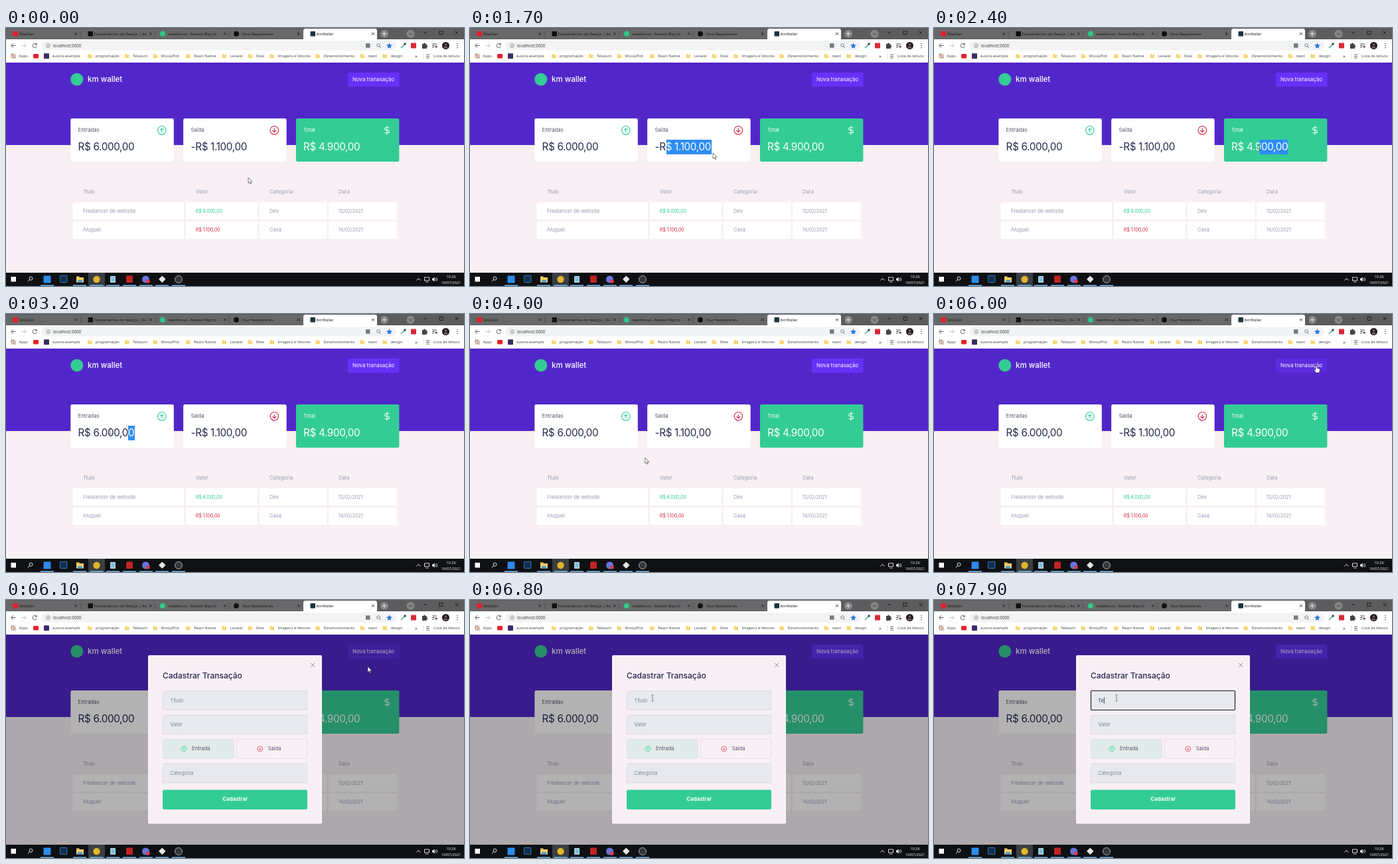
An HTML page that plays this animation: 690 px wide and 388 px high, repeating every 8 s.

```html
<!DOCTYPE html>
<html lang="pt-BR">
<head>
<meta charset="utf-8">
<title>km wallet</title>
<style>
  html, body { margin: 0; width: 100%; height: 100%; overflow: hidden; background: #101114; }
  svg { display: block; width: 100%; height: 100%; }
  text { white-space: pre; }
  .page { font-family: Inter, sans-serif; }
  .ui { font-family: "Open Sans", sans-serif; }
  .num { letter-spacing: -.02em; }
</style>
</head>
<body>
<svg id="stage" viewBox="0 0 690 388"></svg>
<script>
const GREEN = '#33cc95', RED = '#d92b4b', NAVY = '#24294d', GRAY = '#969cb3', PAGE = '#f8f0f4';
const LOOP = 8000, STEP = 100;

// Markup helpers
const rect = (x, y, w, h, fill, r = 0, more = '') =>
  `<rect x="${x}" y="${y}" width="${w}" height="${h}" rx="${r}" fill="${fill}" ${more}/>`;
const disc = (x, y, r, fill, more = '') => `<circle cx="${x}" cy="${y}" r="${r}" fill="${fill}" ${more}/>`;
const line = (d, color, w = 1, more = '') =>
  `<path d="${d}" fill="none" stroke="${color}" stroke-width="${w}" ${more}/>`;
const shape = (d, fill, more = '') => `<path d="${d}" fill="${fill}" ${more}/>`;
const text = (x, y, s, size, fill, more = '') =>
  `<text x="${x}" y="${y}" font-size="${size}" fill="${fill}" ${more}>${s}</text>`;
const group = (content, more = '') => `<g ${more}>${content}</g>`;
const MIDDLE = 'text-anchor="middle"';

const cross = (x, y, r, color, w) =>
  line(`M${x - r} ${y - r}l${2 * r} ${2 * r}m0 ${-2 * r}l${-2 * r} ${2 * r}`, color, w);
const arrowCircle = (x, y, r, color, up) => {
  const k = r * (up ? -.45 : .45);
  return disc(x, y, r, 'none', `stroke="${color}" stroke-width="${r * .18}"`) +
    line(`M${x} ${y - k}V${y + k}M${x - r * .45} ${y}L${x} ${y + k}L${x + r * .45} ${y}`, color, r * .18);
};

function browser() {
  const tabs = [
    [0, 'TelaZum', '#e3212c'], [113, 'Fundamentos do Next.js | Au', '#111'],
    [225, 'readme.so - Easiest Way to', '#2fc98b'], [336, 'Your Repositories', '#111'],
    [448, 'KmWallet', '#1d3440']];
  const folders = [
    [126, 'programação'], [182, 'Telazum'], [224.5, 'MossyPlot'], [274, 'React Native'], [328.5, 'Laravel'],
    [367.5, 'Sites'], [400.5, 'Imagens e Vetores'], [469.5, 'Desenvolvimento'], [536.5, 'react'], [570.5, 'design']];
  const label = (x, name) => text(x, 44.1, name, 5.75, '#3c4043');

  let s = rect(0, 0, 690, 18, '#5c5c5e') + rect(0, 1, 448, 17, '#68686a') +
    rect(448, 1, 111, 20, '#fff', 3) + rect(0, 17, 690, 35, '#fff');
  tabs.forEach(([x, title, color], i) => {
    s += (i % 4 < 2 ? rect(x + 10.5, 5, 7.5, 7.5, color, 1) : disc(x + 11, 8.8, 4, color)) +
      text(x + 19.5, 11, title, 5.8, '#151515') + cross(x + 105, 8.7, 1.8, '#151515', .8);
    if (i && i < 4) s += line(`M${x} 4V14`, '#3b3b3d', .6);
  });
  s += disc(570, 8.7, 6, '#868688') + line('M567 8.7h6M570 5.7v6', '#eee', .9) +
    disc(609.5, 8.7, 6, '#868688') + line('M607 7.7l2.5 2.5l2.5-2.5', '#222', .9) +
    line('M629 7h5', '#111', .8) + rect(653, 4.5, 5, 5, 'none', 0, 'stroke="#111" stroke-width=".8"') +
    cross(679, 7, 2.5, '#111', .8);

  // Address row
  s += rect(53, 19.5, 535, 14, '#f1f3f4', 7) +
    line('M14.5 26.5H8M11 23.3l-3.2 3.2l3.2 3.2', '#4b4d50', .9) +
    line('M23.5 26.5H30M27 23.3l3.2 3.2l-3.2 3.2', '#b8babd', .9) +
    line('M46 24.7a3.2 3.2 0 1 0 .3 3M46.3 22.8v2.4h-2.4', '#4b4d50', .9) +
    disc(63.5, 26.5, 2.8, 'none', 'stroke="#666" stroke-width=".7"') + line('M63.5 26v2M63.5 24.7v.6', '#666', .7) +
    text(71, 28.6, 'localhost:3000', 6.3, '#333') +
    rect(542, 23.2, 6.5, 6.5, '#777b80', 1) +
    disc(561, 26, 2.3, 'none', 'stroke="#666" stroke-width=".8"') + line('M562.7 27.7l2.2 2.2', '#666', .9) +
    shape('M577.5 22.3l1.3 2.8 3 .4-2.2 2.1.5 3-2.6-1.4-2.6 1.4.5-3-2.2-2.1 3-.4z', '#2874e6') +
    line('M595 30l5-5', '#36b08c', 1.4) + disc(601, 24, 1.8, '#344') +
    rect(610, 22.5, 8, 8, '#dc2937', 1) +
    shape('M627 24h2a1.4 1.4 0 0 1 2.8 0h2v2.2a1.4 1.4 0 0 1 0 2.8v2h-6.8z', '#444') +
    line('M642 24h7M642 26.5h4M642 29h3', '#444', 1) + shape('M647 26l3.5 2-3.5 2z', '#444') +
    disc(662.5, 26.5, 5.5, '#221d20') + disc(662.5, 25, 1.8, '#76605c') +
    shape('M659.5 30.5a3 3 0 0 1 6 0z', '#76605c') +
    [23.5, 26.5, 29.5].map(y => disc(680, y, .8, '#444')).join('');

  // Bookmarks row
  const dots = ['#dc4a3d', '#3d78d8', '#e9ae2b'];
  for (let i = 0; i < 9; i++) {
    const row = Math.floor(i / 3);
    s += rect(7.5 + i % 3 * 2.5, 38.7 + row * 2.5, 1.8, 1.8, dots[(i + row) % 3]);
  }
  s += label(19.5, 'Apps') + rect(41, 39, 8, 6.5, '#e3212c', 1) +
    rect(57, 38.3, 8, 8, '#3d2b67', 1) + label(69.5, 'autora.example');
  for (const [x, name] of folders)
    s += shape(`M${x - 3} 39.3h2.5l1 1h3v5h-6.5z`, '#f7d774') + label(x + 9, name);
  return s + text(616, 44.6, '»', 7.5, '#333') + line('M629 38v9', '#ccc', .6) +
    line('M633 40h5M633 42.5h5M633 45h5', '#555', .9) + label(644, 'Lista de leitura');
}

function taskbar() {
  let s = rect(0, 368, 690, 20, '#0e1013') + rect(124, 368, 25, 20, '#3b3e41') +
    rect(7.5, 374, 7.5, 7.5, '#fff') +
    disc(37.5, 376.7, 2.5, 'none', 'stroke="#fff" stroke-width=".9"') + line('M35.7 378.5l-3 3', '#fff', .9) +
    rect(56.5, 372.5, 11, 11, '#2c8be8', 1) +
    rect(81.5, 372.5, 10.5, 10, '#12304d', 1, 'stroke="#3aa5ef" stroke-width=".7"') +
    shape('M106 373.5h4l1 1.5h6v7.5h-11z', '#f4cd62') + rect(108, 379, 7, 3.5, '#4a9cdc') +
    disc(136.5, 378, 5.2, '#e0b42e') + rect(157, 373, 8, 10, '#9fd5e6', 1) +
    line('M158.5 376h5M158.5 378h5M158.5 380h5', '#467b96', .6) +
    rect(181, 372.5, 10, 10.5, '#c32222', 1) + disc(210.5, 378, 5.5, '#6674dd') + disc(214, 381, 2.8, '#e23c41') +
    rect(231.5, 374, 7.5, 7.5, '#e8e4df', 1, 'transform="rotate(45 235.25 377.75)"') +
    disc(260, 378, 5.5, '#34373b', 'stroke="#c9c9c9" stroke-width=".8"');
  for (const x of [62, 111, 136.5, 161, 186, 211, 235, 260]) s += rect(x - 10, 386.5, 20, 1.5, '#76b9ed');
  return s + line('M618.5 379.5l3-3l3 3', '#fff', .9) +
    rect(630.5, 375, 7, 4.8, 'none', 0, 'stroke="#fff" stroke-width=".8"') + line('M632 382h4.5', '#fff', .8) +
    shape('M642 376.5h1.7l2-2v7l-2-2H642z', '#fff') + line('M647 376q1.5 2 0 4M648.7 375q2.3 3 0 6', '#fff', .7) +
    text(670.5, 375.6, '10:26', 5.6, '#fff', MIDDLE) + text(670.5, 384.6, '19/07/2021', 5.6, '#fff', MIDDLE);
}

const amounts = colors => [[108.5, 'R$ 6.000,00'], [278.5, '-R$ 1.100,00'], [448, 'R$ 4.900,00']]
  .map(([x, value], i) => text(x, 184.3, value, 15.2, colors[i], 'class="num"')).join('');

function dashboard() {
  const columns = [[100.5, 167.5, 116], [271, 108, 285.7], [382, 101.5, 397], [486, 103, 501]];
  const rows = [['Freelancer de website', 'R$ 6.000,00', 'Dev', '12/02/2021'], ['Aluguel', 'R$ 1.100,00', 'Casa', '14/02/2021']];
  let s = rect(0, 52, 690, 316, PAGE) + rect(0, 52, 690, 124, '#5227c9') +
    disc(106.8, 77.3, 9.5, GREEN) + text(123, 81.3, 'km wallet', 11.5, '#fff', 'font-weight="500"') +
    rect(515, 67, 77.5, 21.3, '#6631f7', 2.5, 'id="button"') + text(553.5, 80.2, 'Nova tranasação', 7.9, '#fff', MIDDLE);
  ['Entradas', 'Saída', 'Total'].forEach((label, i) => {
    const x = 97.3 + i * 169.8;
    s += rect(x, 136, 155.5, 65, i < 2 ? '#fff' : GREEN, 2.5) + text(x + 11.3, 156.3, label, 7.7, i < 2 ? '#50556a' : '#fff');
  });
  s += arrowCircle(234.7, 153.8, 6.3, GREEN, true) + arrowCircle(404.3, 153.8, 6.3, RED, false) +
    line('M12 1v22M17 5H9.5a3.5 3.5 0 0 0 0 7h5a3.5 3.5 0 0 1 0 7H6', '#fff', 1.8,
      'transform="translate(567.2 147) scale(.57)" stroke-linecap="round"') +
    amounts([NAVY, NAVY, '#fff']);
  ['Ttulo', 'Valor', 'Categoria', 'Data'].forEach((name, i) => s += text(columns[i][2], 248.6, name, 7.7, GRAY));
  rows.forEach((row, r) => columns.forEach(([x, w, tx], c) => {
    const number = c % 2 === 1;
    s += rect(x, 262 + r * 29, w, 26, '#fff', 2.2) +
      text(tx, 277.5 + r * 28.7, row[c], number ? 7.2 : 7.6, c === 1 ? [GREEN, RED][r] : GRAY, number ? 'class="num"' : '');
  }));
  return s;
}

function modal() {
  const border = 'stroke="#d3d4da" stroke-width=".6"';
  let s = rect(0, 52, 690, 316, '#000', 0, 'opacity=".3"') + rect(214, 83, 262, 253.5, '#f9f0f5', 2.2) +
    cross(462, 97.8, 3, '#85808c', .9) + text(236, 117.6, 'Cadastrar Transação', 12, NAVY, 'font-weight="500"');
  [['Título', 136.5, 'id="placeholder"'], ['Valor', 173, ''], ['Categoria', 246, '']].forEach(([name, y, id]) =>
    s += rect(236.2, y, 217.6, 29, '#e7e9ee', 2.2, border) + text(247.3, y + 17, name, 7.6, '#85868f', id));
  return s + rect(236.5, 136.5, 217, 29, 'none', 1.5, 'id="focus" stroke="#17181d" stroke-width="1.1"') +
    text(247.3, 153.5, '', 7.5, '#363f5f', 'id="typed"') + rect(0, 146.2, .8, 9.5, '#222', 0, 'id="caret"') +
    rect(236.2, 209.2, 106.6, 29, '#e1ebea', 2.2, border) + rect(347.2, 209.2, 106.6, 29, 'none', 2.2, border) +
    arrowCircle(268, 223.8, 4, GREEN, true) + text(280, 226.2, 'Entrada', 7.6, '#50556a') +
    arrowCircle(382.7, 223.8, 4, RED, false) + text(394.7, 226.2, 'Saída', 7.6, '#50556a') +
    rect(236, 285.5, 218, 29.5, GREEN, 2.2) + text(345, 302.4, 'Cadastrar', 7.8, '#fff', MIDDLE + ' font-weight="700"');
}

const pointers =
  group(shape('M0 0V8.5l2-1.8 1.3 3 1.3-.6-1.3-2.9H6z', '#fff', 'stroke="#222" stroke-width=".6"'), 'id="arrow"') +
  group(line('M-1.5-4.5H1.5M0-4.5v9M-1.5 4.5H1.5', '#555', .7), 'id="beam"') +
  group(shape('M-1 1q1-1.5 2 0v3.5l3.5.8q1 .5 .8 2l-.8 4H-.5l-3-4q0-1.5 1.3-.8L-1 7.5z', '#fff',
    'stroke="#222" stroke-width=".6"'), 'id="hand"');

document.getElementById('stage').innerHTML =
  '<clipPath id="marked"><rect id="clip" y="168" height="22"/></clipPath>' +
  group(dashboard() + group(rect(0, 168, 690, 22, '#2f8df5') + amounts(['#fff', '#fff', '#fff']), 'clip-path="url(#marked)"'), 'class="page"') +
  group(modal(), 'id="modal" class="page"') + group(browser() + taskbar(), 'class="ui"') + pointers;

// Pointer keys: time, x, y, pointer
const path = [
  [0, 365, 225, 'arrow'], [500, 365, 225, 'arrow'], [700, 365, 223, 'arrow'], [900, 325, 200, 'arrow'],
  [1100, 295, 180, 'beam'], [1500, 362, 180, 'beam'], [1700, 366, 188, 'arrow'], [2100, 560, 184, 'arrow'],
  [2200, 534, 180, 'beam'], [2600, 447, 180, 'beam'], [2700, 425, 180, 'arrow'], [3100, 195, 178, 'beam'],
  [3200, 157, 176, 'beam'], [3400, 114, 178, 'beam'], [3700, 190, 182, 'arrow'], [4200, 313, 239, 'arrow'],
  [4500, 285, 237, 'arrow'], [4800, 314, 235, 'arrow'], [5200, 358, 172, 'arrow'], [5700, 565, 84, 'hand'],
  [5900, 576, 77, 'hand'], [6000, 576, 77, 'hand'], [6100, 545, 100, 'arrow'], [6500, 340, 128, 'arrow'],
  [6700, 275, 147.5, 'beam'], [LOOP, 275, 147.5, 'beam']];

// Text selections: end time, then keys of time, left, right
const selections = [
  [2200, [[1100, 296, 296], [1500, 296, 364]]],
  [3100, [[2200, 533, 533], [2600, 448, 533]]],
  [3700, [[3100, 194, 194], [3200, 184, 194], [3400, 112, 194]]]];

function sample(keys, t) {
  const next = keys.findIndex(key => key[0] > t);
  if (next < 0) return keys[keys.length - 1].slice(1);
  const a = keys[next - 1], b = keys[next];
  const p = (t - a[0]) / (b[0] - a[0]);
  return a.slice(1).map((v, i) => typeof v === 'number' ? v + (b[i + 1] - v) * p : v);
}

const $ = id => document.getElementById(id);
const show = (id, on) => $(id).setAttribute('visibility', on ? 'inherit' : 'hidden');

function draw(t) {
  const [x, y, pointer] = sample(path, t);
  for (const id of ['arrow', 'beam', 'hand']) show(id, id === pointer);
  $(pointer).setAttribute('transform', `translate(${x} ${y})`);

  const active = selections.find(([end, keys]) => t >= keys[0][0] && t < end);
  const [left, right] = active ? sample(active[1], t) : [0, 0];
  $('clip').setAttribute('x', left);
  $('clip').setAttribute('width', right - left);

  $('button').setAttribute('fill', t >= 5700 && t <= 6100 ? '#5c2cde' : '#6631f7');
  show('modal', t >= 6100);
  show('focus', t >= 6900);
  show('placeholder', t < 7700);
  $('typed').textContent = t < 7700 ? '' : t < 7900 ? 'T' : 'Te';
  $('caret').setAttribute('x', 247.3 + $('typed').getComputedTextLength());
  show('caret', t >= 6900 && t < 7400 || t >= 7700);
}

function frame() {
  draw(Math.floor(performance.now() % LOOP / STEP) * STEP);
  requestAnimationFrame(frame);
}
frame();
</script>
</body>
</html>
```
